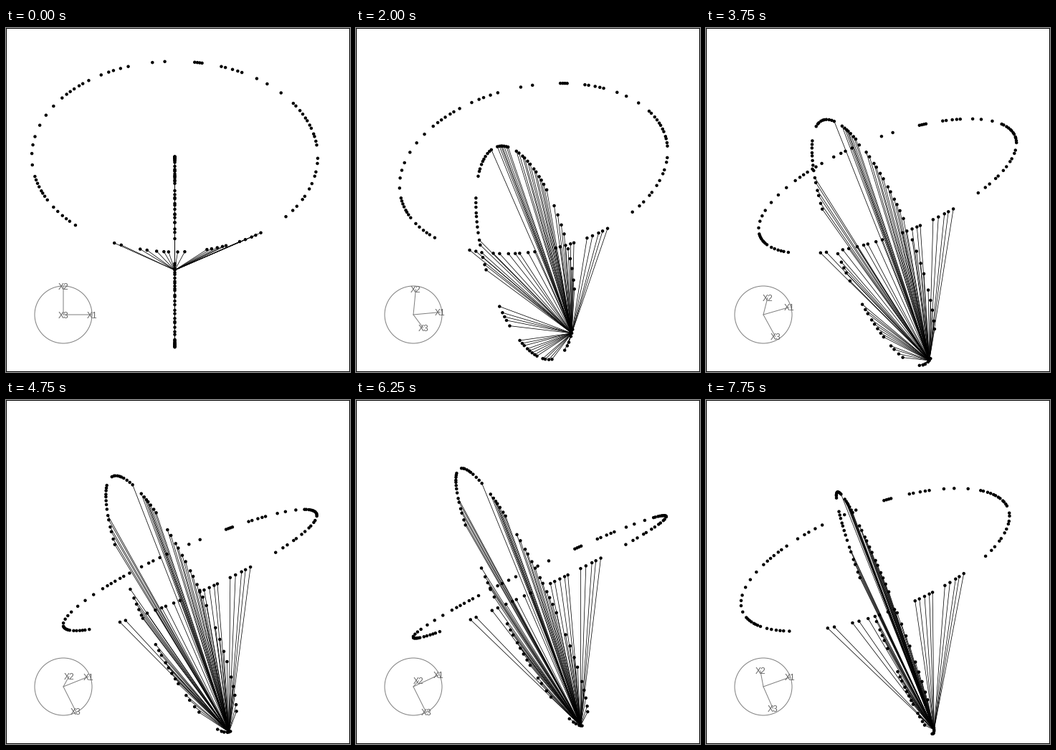
These frames come from a looping animation (480 px wide and 480 px high, 8 s). A matplotlib script:

```python
import numpy as np
import matplotlib.pyplot as plt
from matplotlib.animation import FuncAnimation
from matplotlib.collections import LineCollection
from matplotlib.patches import Circle, Rectangle

SIZE, DPI = 480, 96
PX = 72 / DPI                       # points per pixel
MID = SIZE / 2
GREY, INK = "#7f7f7f", "#666666"
LONG, SHORT = 199.5, 133            # ring radii after scaling each variable
HUB_ANGLE = -11

# Stretches of each ring that hold points: from, to (degrees), how many.
FLAT_ARCS = [(-39, -1, 11), (-63, -53, 5), (-77, -69, 5), (-104, -86, 7),
             (-115, -112, 2), (-148, -134, 6), (-168, -153, 8),
             (148, 185, 7), (127, 142, 7), (109, 121, 5), (94, 99, 2),
             (79, 82, 4), (62, 71, 5), (42, 55, 3), (7, 34, 12)]
DEEP_ARCS = [(143, 172, 10), (120, 134, 7), (74, 110, 12), (48, 64, 4),
             (18, 40, 5), (-28, -8, 5), (-60, -48, 4), (-87, -67, 8),
             (-112, -99, 5), (-149, -133, 6), (-173, -153, 8)]

# The viewing direction follows great circles: (frames, direction at the end).
LEGS = [(9, (-.378, .507, .775)), (9, (-.329, .889, .315)),
        (5, (-.299, .952, -.052)), (8, (-.107, .823, .557))]

rng = np.random.default_rng(4)


def scatter(arcs):
    """Angles spread over the arcs, uneven except at the arc ends."""
    out = []
    for start, end, count in arcs:
        angles = np.linspace(start, end, count)
        step = (end - start) / (count - 1)
        angles[1:-1] += rng.uniform(-0.25, 0.25, count - 2) * step
        out.extend(angles)
    return np.radians(out)


def flat_ring(t):
    return np.stack([LONG * np.cos(t) - 4.5, SHORT * np.sin(t) + 60.5,
                     np.full_like(t, 20)], axis=-1)


def deep_ring(t):
    return np.stack([np.full_like(t, -4.5), SHORT * np.sin(t) - 72.5,
                     LONG * np.cos(t) + 20], axis=-1)


def within(points, reach):
    return points[np.linalg.norm(points - hub, axis=1) < reach]


hub = deep_ring(np.radians([HUB_ANGLE]))[0]
flat = flat_ring(scatter(FLAT_ARCS))
deep = deep_ring(scatter(DEEP_ARCS))
cloud = np.vstack([flat, deep, hub])
linked = np.vstack([within(flat, 242), within(deep, 372)])


def turn(vectors, axis, angle):
    """Rotate the rows of an array about a unit axis."""
    along = np.outer(vectors @ axis, axis)
    return (vectors * np.cos(angle) + np.cross(axis, vectors) * np.sin(angle)
            + along * (1 - np.cos(angle)))


def basis(frame):
    """Horizontal and vertical screen directions, without spin."""
    b = np.eye(3)
    for length, goal in LEGS:
        if frame <= 0:
            break
        goal = np.array(goal) / np.linalg.norm(goal)
        axis = np.cross(b[2], goal)
        sine = np.linalg.norm(axis)
        angle = np.arctan2(sine, b[2] @ goal)
        b = turn(b, axis / sine, angle * min(frame / length, 1))
        frame -= length
    return b[:2]


def project(points, b):
    return MID + (points @ b.T) * (1, -1)


fig = plt.figure(figsize=(SIZE / DPI, SIZE / DPI), dpi=DPI, facecolor="white")
ax = fig.add_axes([0, 0, 1, 1])
ax.set_xlim(0, SIZE)
ax.set_ylim(SIZE, 0)
ax.axis("off")


def strokes(color, width, zorder):
    """Round-capped lines kept at fractions of a pixel."""
    lines = LineCollection([], colors=color, linewidths=width * PX,
                           capstyle="round", snap=False, zorder=zorder)
    return ax.add_collection(lines)


ax.add_patch(Rectangle((0.5, 0.5), SIZE - 1, SIZE - 1, fill=False,
                       ec="black", lw=PX, snap=False))
DIAL, ARM = np.array([80, 400]), 40
ax.add_patch(Circle(DIAL, ARM, fill=False, ec=GREY, lw=PX))
arms = strokes(GREY, 1, 2)
edges = strokes("black", 0.75, 3)
dots = strokes("black", 4.6, 4)
names = [ax.text(0, 0, f"X{i}", color=INK, family="Liberation Sans",
                 size=12 * PX, ha="center", va="baseline", zorder=5)
         for i in (1, 2, 3)]


def draw(frame):
    b = basis(frame)
    # A dot is a very short line with round caps.
    dots.set_segments([(p, p + (0.01, 0)) for p in project(cloud, b)])
    start = project(hub, b)
    edges.set_segments([(start, end) for end in project(linked, b)])
    tips = DIAL + ARM * b.T * (1, -1)
    arms.set_segments([(DIAL, tip) for tip in tips])
    for name, (x, y) in zip(names, tips):
        name.set_position((x, y + 4.6))
    return [dots, edges, arms, *names]


anim = FuncAnimation(fig, draw, frames=32, interval=250, repeat=True,
                     repeat_delay=0)
plt.show()
```
